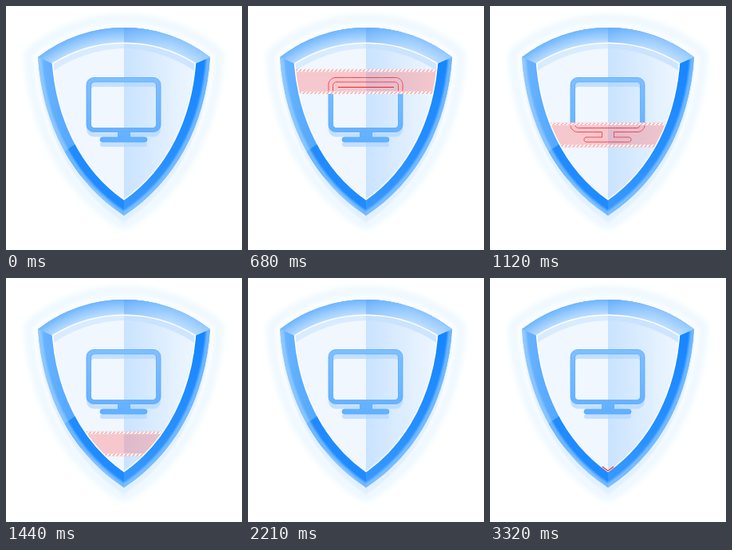
These frames come from a looping animation (296 by 305 pixels, 3350 ms). An HTML page:

```html
<!DOCTYPE html>
<html lang="en">
<head>
<meta charset="utf-8">
<title>Shield scan</title>
<style>
html, body { margin: 0; width: 100%; height: 100%; overflow: hidden; background: #fff; }
svg { display: block; width: 100%; height: 100%; }
</style>
</head>
<body>
<svg viewBox="0 0 296 305">
  <defs>
    <path id="outer" d="M40 64A176 176 0 0 1 256 64C250 150 212 220 148 262C84 220 46 150 40 64Z"/>
    <path id="inner" d="M58.500 72A169 169 0 0 1 237.500 72C232 140 203 203 148 242C93 203 64 140 58.500 72Z"/>
    <path id="half" d="M148 46.5A169 169 0 0 0 59 72.5C64.5 140 93.5 203 148 241"/>
    <path id="monitor" fill-rule="evenodd" d="M110 89.5H185a9 9 0 0 1 9 9V148.500a9 9 0 0 1-9 9H155.500V164H174a3 3 0 0 1 0 6H121a3 3 0 0 1 0-6H140.500V157.500H110a9 9 0 0 1-9-9V98.5a9 9 0 0 1 9-9ZM111 95a4.5 4.5 0 0 0-4.5 4.5V148a4.500 4.500 0 0 0 4.500 4.500H184a4.500 4.500 0 0 0 4.500-4.500V99.500A4.500 4.500 0 0 0 184 95Z"/>
    <linearGradient id="leftRim"><stop stop-color="#6cb4ff"/><stop offset=".3" stop-color="#58abff"/><stop offset="1" stop-color="#3f9eff"/></linearGradient>
    <linearGradient id="rightRim" x1="0" y1="0" x2="0" y2="1"><stop offset=".2" stop-color="#1686ff"/><stop offset=".7" stop-color="#2790ff"/><stop offset="1" stop-color="#3b9aff"/></linearGradient>
    <radialGradient id="topRim" gradientUnits="userSpaceOnUse" cx="148" cy="203" r="176">
      <stop offset=".89" stop-color="#c2e0ff"/><stop offset=".96" stop-color="#8ec6ff"/><stop offset="1" stop-color="#6eb5ff"/>
    </radialGradient>
    <linearGradient id="topTint"><stop stop-color="#4a9dfb" stop-opacity=".35"/><stop offset=".5" stop-color="#c8e3ff" stop-opacity=".3"/><stop offset="1" stop-color="#c8e3ff" stop-opacity=".45"/></linearGradient>
    <linearGradient id="rightFace"><stop stop-color="#c9e3ff"/><stop offset=".7" stop-color="#e6f2ff"/><stop offset="1" stop-color="#f2f8ff"/></linearGradient>
    <linearGradient id="screen" x1="0" y1="0" x2="0" y2="1"><stop stop-color="#7fbfff"/><stop offset="1" stop-color="#62b0ff"/></linearGradient>
    <filter id="soft" x="-20%" y="-20%" width="140%" height="140%"><feGaussianBlur stdDeviation="5"/></filter>
    <filter id="bevel"><feGaussianBlur stdDeviation="1.200"/></filter>
    <pattern id="hatch" width="5" height="3.500" patternUnits="userSpaceOnUse">
      <rect width="5" height="3.500" fill="#f5b4b8"/>
      <path d="M0 3.500L3 0H5.500L2.500 3.500ZM-5 3.500L-2 0H.5L-2.500 3.500Z" fill="#fff"/>
    </pattern>
    <clipPath id="inBody"><use href="#outer"/></clipPath>
    <clipPath id="inFace"><use href="#inner"/></clipPath>
    <clipPath id="inBand"><rect id="window" x="40" width="216" height="31"/></clipPath>
    <g id="face">
      <rect x="50" y="40" width="98" height="210" fill="#f0f7ff"/>
      <rect x="148" y="40" width="98" height="210" fill="url(#rightFace)"/>
      <path d="M50 40H148V53A169 169 0 0 0 58 82Z" fill="#d9ecff"/>
      <path d="M246 40H148V53A169 169 0 0 1 238 82Z" fill="#c4e1ff" opacity=".75"/>
    </g>
  </defs>

  <g filter="url(#soft)" stroke-linejoin="round">
    <use href="#outer" fill="none" stroke="#e3f4ff" stroke-width="30"/>
    <use href="#outer" fill="#fff" stroke="#fff" stroke-width="15"/>
  </g>
  <use href="#outer" transform="translate(0 9)" fill="#e2f1ff" filter="url(#bevel)"/>

  <g clip-path="url(#inBody)">
    <rect x="40" y="20" width="108" height="245" fill="url(#leftRim)"/>
    <path d="M66 187L92 169L148 210V262Z" fill="#1f8bff"/>
    <rect x="148" y="20" width="108" height="245" fill="url(#rightRim)"/>
    <use href="#outer" fill="none" stroke="#a8d5ff" stroke-width="10" opacity=".6" filter="url(#bevel)"/>
    <path d="M30 20H266L256 64L237.500 72A169 169 0 0 0 58.500 72L40 64Z" fill="url(#topRim)"/>
    <path d="M266 20H148V46A169 169 0 0 1 237.500 72L256 64Z" fill="url(#topTint)"/>
  </g>

  <g clip-path="url(#inFace)">
    <use href="#face"/>
    <use href="#monitor" y="6" fill="#b2d8ff" opacity=".7"/>
    <use href="#monitor" fill="url(#screen)" stroke="#5aaaff" stroke-width=".8"/>
    <g clip-path="url(#inBand)">
      <use href="#face"/>
      <rect x="40" y="40" width="216" height="210" fill="#ff6e6e" opacity=".35"/>
      <g fill="none" stroke="#fa1f2c">
        <use href="#monitor" stroke-dasharray="1.600 .5"/>
        <path d="M113 101.500H183"/>
      </g>
      <g id="edges" fill="url(#hatch)">
        <rect x="40" width="216" height="3.500"/>
        <rect x="40" width="216" height="3.500" transform="translate(0 27.500)"/>
      </g>
    </g>
  </g>
  <use href="#inner" fill="none" stroke="#fff" stroke-width="1.500"/>

  <g id="trace" fill="none" stroke="#ee3239" stroke-width="1.400">
    <use href="#half"/>
    <use href="#half" transform="matrix(-1 0 0 1 296 0)"/>
  </g>
</svg>
<script>
const LOOP = 3350, DASH = 39;
const get = id => document.getElementById(id);
const bandWindow = get('window'), edges = get('edges'), trace = get('trace');
const length = get('half').getTotalLength();

function moveBand(t) {
  const d = t - 680;
  const y = 79 + 0.156 * d - 0.00001 * d * d;
  bandWindow.setAttribute('y', y);
  edges.setAttribute('transform', `translate(0 ${y})`);
}

// A dash runs down both sides and slows toward the tip.
function moveTrace(t) {
  const tail = length - 108 * Math.exp(-0.0021 * (t - 2810)) + 28;
  const from = Math.max(0, tail), to = Math.min(length, tail + DASH);
  const shown = t > 2210 && to > from;
  trace.setAttribute('visibility', shown ? 'visible' : 'hidden');
  if (shown) trace.setAttribute('stroke-dasharray', `0 ${from} ${to - from} 999`);
}

let start;
function draw(now) {
  start ??= now;
  const t = (now - start) % LOOP;
  moveBand(t);
  moveTrace(t);
  requestAnimationFrame(draw);
}
requestAnimationFrame(draw);
</script>
</body>
</html>
```
